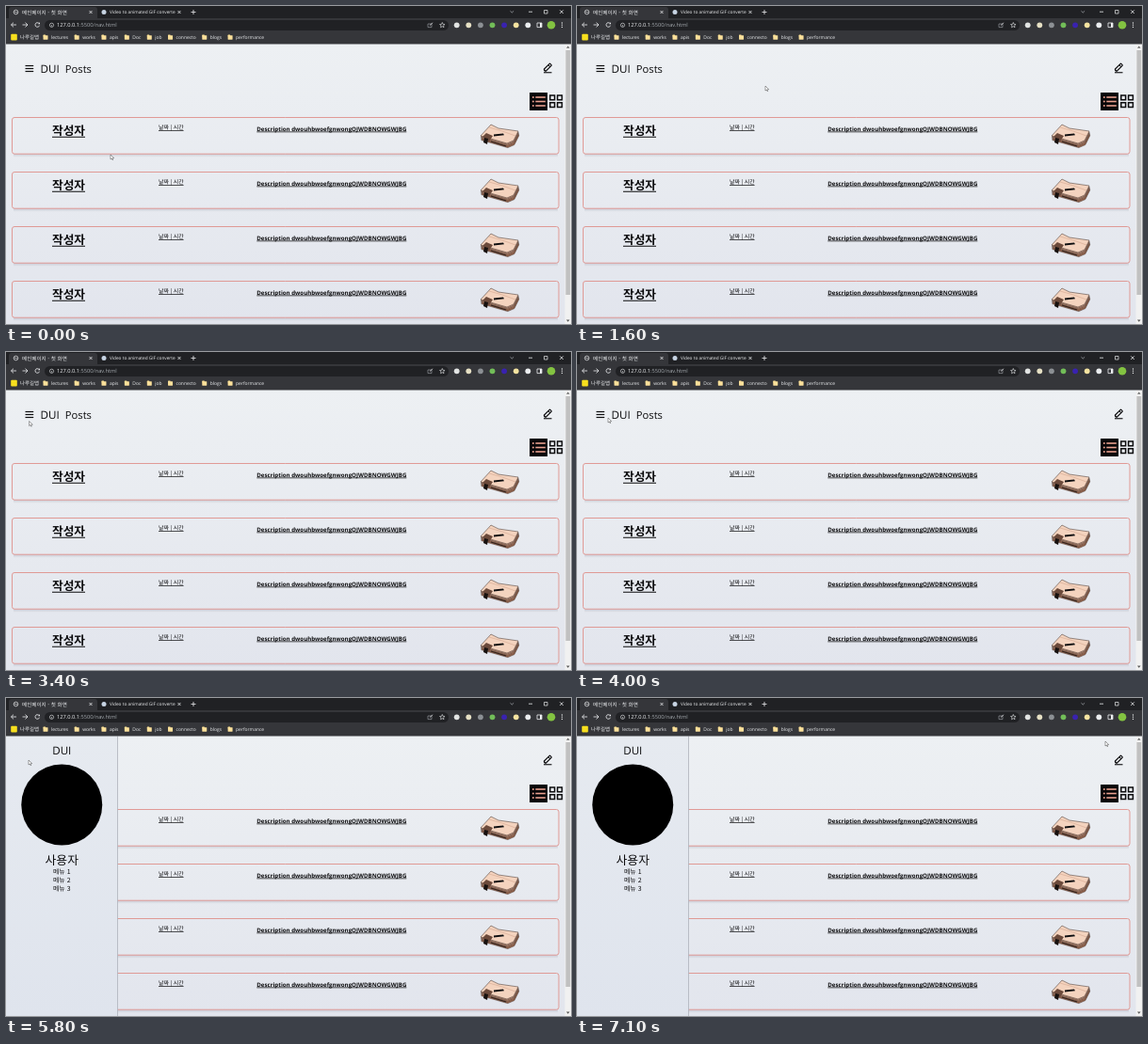
Write an HTML page with a canvas that moves like this. It is 600x338 px and loops after 7.2 s.

```html
<!DOCTYPE html>
<html lang="ko">
<head>
<meta charset="utf-8">
<title>Posts</title>
<style>
html, body { margin: 0; width: 100%; height: 100%; overflow: hidden; background: #e6e9ef; }
canvas { display: block; width: 600px; height: 338px; }
</style>
</head>
<body>
<canvas id="stage"></canvas>
<script>
const W = 600, H = 338, LOOP = 7200, STEP = 100;
const TOP = 40.5, SIDE_W = 118.5, OPEN_AT = 5100, OPEN_MS = 400;
const canvas = document.getElementById('stage');
const ctx = canvas.getContext('2d');
const ratio = window.devicePixelRatio || 1;
canvas.width = W * ratio;
canvas.height = H * ratio;

const KOREAN = '"Noto Sans CJK KR", "Noto Sans CJK", "Noto Sans", sans-serif';
const LATIN = '"Open Sans", "Noto Sans", sans-serif';
const INK = '#0c0c0e', LIGHT = '#eceef0', GREY = '#a2a7ac', DARK = '#202124', BAR = '#35363a';

// Places where the pointer rests or turns.
const STOPS = [
  { t: 0, x: 111, y: 158 },
  { t: 1600, x: 200, y: 85 },
  { t: 2700, x: 14, y: 78 },
  { t: 4000, x: 33, y: 70 },
  { t: 4500, x: 24, y: 66 },
  { t: 5900, x: 24, y: 66 },
  { t: 6700, x: 592, y: 58 },
  { t: 7100, x: 561, y: 46 }
];

const ease = (t, from, length) => {
  const k = Math.max(0, Math.min(1, (t - from) / length));
  return k * k * (3 - 2 * k);
};

function pointerAt(t) {
  const i = Math.max(1, STOPS.findIndex(s => s.t >= t));
  const a = STOPS[i - 1], b = STOPS[i], k = ease(t, a.t, b.t - a.t);
  return [a.x + (b.x - a.x) * k, a.y + (b.y - a.y) * k];
}

function at(x, y, paint, flip = 1) {
  ctx.save();
  ctx.translate(x, y);
  ctx.scale(flip, 1);
  paint();
  ctx.restore();
}

function stroke(color, width) {
  ctx.strokeStyle = color;
  ctx.lineWidth = width;
  ctx.stroke();
}

function box(x, y, w, h, fill, r = 0) {
  ctx.fillStyle = fill;
  ctx.beginPath();
  ctx.roundRect(x, y, w, h, r);
  ctx.fill();
}

function frame(x, y, w, h, color, width, r = 0) {
  ctx.beginPath();
  ctx.roundRect(x, y, w, h, r);
  stroke(color, width);
}

function dot(x, y, r, fill) {
  box(x - r, y - r, 2 * r, 2 * r, fill, r);
}

function ring(x, y, r, color, width = 0.7, from = 0, to = 2 * Math.PI) {
  ctx.beginPath();
  ctx.arc(x, y, r, from, to);
  stroke(color, width);
}

function trace(points, closed) {
  ctx.beginPath();
  for (let i = 0; i < points.length; i += 2) ctx.lineTo(points[i], points[i + 1]);
  if (closed) ctx.closePath();
}

function line(points, color = LIGHT, width = 0.8) {
  trace(points);
  stroke(color, width);
}

function shape(points, fill, edge, width = 0.5) {
  trace(points, true);
  ctx.fillStyle = fill;
  ctx.fill();
  if (edge) stroke(edge, width);
}

function text(str, x, y, size, { color = INK, weight = 400, font = KOREAN, align = 'left' } = {}) {
  ctx.font = `${weight} ${size}px ${font}`;
  ctx.textAlign = align;
  ctx.fillStyle = color;
  ctx.fillText(str, x, y);
  return ctx.measureText(str).width;
}

function link(str, x, y, size, style) {
  const width = text(str, x, y, size, style);
  box(x, y + size * 0.15, width, Math.max(0.7, size * 0.08), INK);
}

const uiText = { color: LIGHT, font: LATIN };

function cross(x, y, r) {
  line([x - r, y - r, x + r, y + r]);
  line([x - r, y + r, x + r, y - r]);
}

function tabs() {
  box(0, 0, W, 14, DARK);
  box(3, 1, 94, 16, BAR, 3);
  ring(10.5, 6.5, 2.3, LIGHT);
  line([8.5, 6, 12.5, 7], LIGHT, 0.6);
  text('메인페이지 - 첫 화면', 17, 8.6, 5.6, { color: LIGHT });
  cross(90, 6.5, 1.5);
  dot(104, 6.5, 2.5, '#c6d3e2');
  text('Video to animated GIF converte', 110, 8.3, 4.75, uiText);
  cross(184, 6.5, 1.5);
  line([196.5, 6.5, 201.5, 6.5]);
  line([199, 4, 199, 9]);
  line([535.5, 5.3, 537.3, 7, 539.1, 5.3], GREY);
  line([555, 6.2, 559, 6.2]);
  frame(571.5, 4.5, 3.5, 3.5, LIGHT, 0.7);
  cross(590, 6.2, 1.8);
}

function backArrow() {
  line([5.5, 0, 0, 0]);
  line([2.5, -2.4, 0, 0, 2.5, 2.4]);
}

function star(x, y, r) {
  const points = [];
  for (let i = 0; i < 10; i++) {
    const a = (i / 5 - 0.5) * Math.PI, d = i % 2 ? r * 0.45 : r;
    points.push(x + d * Math.cos(a), y + d * Math.sin(a));
  }
  trace(points, true);
  stroke(LIGHT, 0.6);
}

function toolbar() {
  box(0, 13, W, TOP - 13, BAR);
  at(5.5, 20, backArrow);
  at(23, 20, backArrow, -1);
  ring(33.3, 20, 2.3, LIGHT, 0.8, 0.3, 5.5);
  shape([34, 19.2, 36, 19.2, 36, 17.2], LIGHT);
  box(41, 15, 429, 11, DARK, 5.5);
  ring(48.5, 20.3, 2.1, LIGHT, 0.6);
  box(48.2, 19.9, 0.6, 1.6, LIGHT);
  const host = text('127.0.0.1', 54, 22.4, 5.7, uiText);
  text(':5500/nav.html', 54 + host, 22.4, 5.7, { color: GREY, font: LATIN });
  frame(448, 19, 4, 3.6, GREY, 0.6);
  line([450, 20.5, 453.2, 17.8], LIGHT, 0.7);
  star(463.3, 20.4, 2.9);

  const colors = ['#e2e4e3', '#e6e0c4', '#8c9094', '#72bd58', '#3922b0', '#f4e3a0', LIGHT];
  colors.forEach((color, i) => dot(478.7 + i * 12.6, 20.3, 2.9, color));
  frame(564, 18, 5, 4.6, LIGHT, 0.8);
  box(567, 18, 2, 4.6, LIGHT);
  dot(579, 20.3, 4.3, '#83c341');
  for (let i = -1; i < 2; i++) dot(590.5, 20.2 + i * 2.2, 0.65, LIGHT);
}

function bookmarks() {
  box(5.2, 29.8, 6.6, 6.6, '#f7df1e', 1);
  text('나루길맵', 15, 35.3, 5.4, { color: LIGHT });
  let x = 42;
  for (const name of 'lectures works apis Doc job connecto blogs performance'.split(' ')) {
    box(x - 2.5, 30.5, 2.6, 2, '#f8dd8e', 0.4);
    box(x - 2.5, 31.2, 5, 4.5, '#fbe09a', 0.4);
    x += 15 + text(name, x + 6, 35, 4.95, uiText);
  }
}

function pageFill(top, bottom) {
  const fill = ctx.createLinearGradient(0, TOP, 0, H);
  fill.addColorStop(0, top);
  fill.addColorStop(1, bottom);
  return fill;
}

const titleText = { font: LATIN };

function header() {
  for (let i = 0; i < 3; i++) box(20.5, 62.9 + i * 3, 8.7, 1.2, INK);
  text('DUI', 36.5, 71.2, 11.6, titleText);
  text('Posts', 62.8, 71.2, 11.2, titleText);

  at(571.3, 69.2, () => {
    ctx.rotate(-Math.PI / 4);
    frame(1.2, -1.4, 9, 2.8, INK, 1.1, 0.5);
    box(7.4, -1.4, 0.9, 2.8, INK);
    shape([0, 0, 1.4, -1.6, 1.4, 1.6], INK);
  });
  box(571, 70.2, 8.5, 1.1, INK);

  box(556, 92, 19, 19, '#060608');
  for (let i = 0; i < 3; i++) {
    const y = 97 + i * 4.5;
    dot(559.8, y, 1, '#eaa18f');
    box(562.3, y - 0.8, 10.5, 1.6, '#eaa18f');
  }
  for (let i = 0; i < 4; i++)
    frame(577.8 + (i % 2) * 7.8, 95 + (i >> 1) * 7.8, 4.8, 4.8, INK, 1.5);
}

function newspaper() {
  const sheet = [1, 13, 12, 1, 20, 5, 41, 8, 36, 18, 29, 21];
  ctx.lineJoin = 'round';
  for (let i = 4; i >= 0; i--)
    at(i * 0.2, i * 1.15, () => shape(sheet, i ? `hsl(20, 38%, ${72 - i * 5}%)` : '#f4d3be', '#3b2b24'));
  line([10, 4, 24, 8, 38, 13], '#d3a78f', 0.6);
  shape([3, 14, 7, 10, 14, 13, 10, 19], '#6b4a3b');
  shape([5, 15, 9, 16, 8, 22, 4, 20], '#17110f');
  line([12, 19, 28, 24], '#30221c', 1.2);
  shape([15, 11.5, 25, 10.5, 26, 12.3, 15, 13.6], INK);
}

function card(y) {
  for (let i = 0; i < 3; i++) box(8, y + 39.2 + i, 578, 1, `rgba(80,85,100,${0.16 - i * 0.05})`);
  frame(6.5, y + 0.5, 580.5, 38.7, '#df918c', 0.9, 2.5);
  link('작성자', 49, y + 18.8, 12.7, { weight: 700 });
  link('날짜 | 시간', 162, y + 13.2, 5.9);
  link('Description dwouhbwoefgnwongOJWDBNOWGWJBG', 266.3, y + 14.7, 6.15, { weight: 700, font: LATIN });
  at(503, y + 7, newspaper);
}

function scrollbar() {
  box(593.5, TOP, 6.5, H, '#f1f1f1');
  box(594.4, 47, 4.8, 260, '#c1c1c1');
  shape([595, 44.7, 598.6, 44.7, 596.8, 42.6], '#666');
  shape([595, 333.6, 598.6, 333.6, 596.8, 335.7], '#555');
}

function sidebar() {
  const middle = SIDE_W / 2;
  box(0, TOP, SIDE_W, H, pageFill('#e6eaf0', '#dfe4ed'));
  box(SIDE_W - 0.5, TOP, 0.8, H, '#aeb2ba');
  text('DUI', middle, 60, 11.6, { ...titleText, align: 'center' });
  dot(middle, 113.5, 43, '#000');
  text('사용자', middle, 177, 12.8, { align: 'center' });
  for (let n = 1; n < 4; n++) text('메뉴 ' + n, middle, 177.3 + n * 9.3, 6.9, { align: 'center' });
}

function arrow() {
  shape([0, 0, 0, 5, 1.3, 4, 2.4, 5.8, 2.3, 3.6, 3.7, 3.6], '#fff', '#444');
}

function hand() {
  for (const edge of [0.4, 0]) {
    const fill = edge ? '#333' : '#fff';
    box(-edge, -edge, 1.2 + 2 * edge, 5 + 2 * edge, fill, 0.6);
    box(-1 - edge, 2.6 - edge, 4.4 + 2 * edge, 3.6 + 2 * edge, fill, 1.2);
  }
}

function draw(t) {
  const edge = SIDE_W * ease(t, OPEN_AT, OPEN_MS);
  const [x, y] = pointerAt(t);
  const onMenu = x > 19 && x < 30 && y > 61 && y < 72 && edge < x;
  ctx.setTransform(ratio, 0, 0, ratio, 0, 0);
  ctx.textRendering = 'geometricPrecision';
  box(0, 0, W, H, pageFill('#edf0f3', '#e2e5ed'));
  header();
  for (let i = 0; i < 4; i++) card(118 + i * 58);
  scrollbar();
  if (edge > 0) at(edge - SIDE_W, 0, sidebar);
  tabs();
  toolbar();
  bookmarks();
  at(x, y, onMenu ? hand : arrow);
}

const start = performance.now();
function tick() {
  const t = (performance.now() - start) % LOOP;
  draw(Math.floor(t / STEP) * STEP);
  requestAnimationFrame(tick);
}
tick();
</script>
</body>
</html>
```
